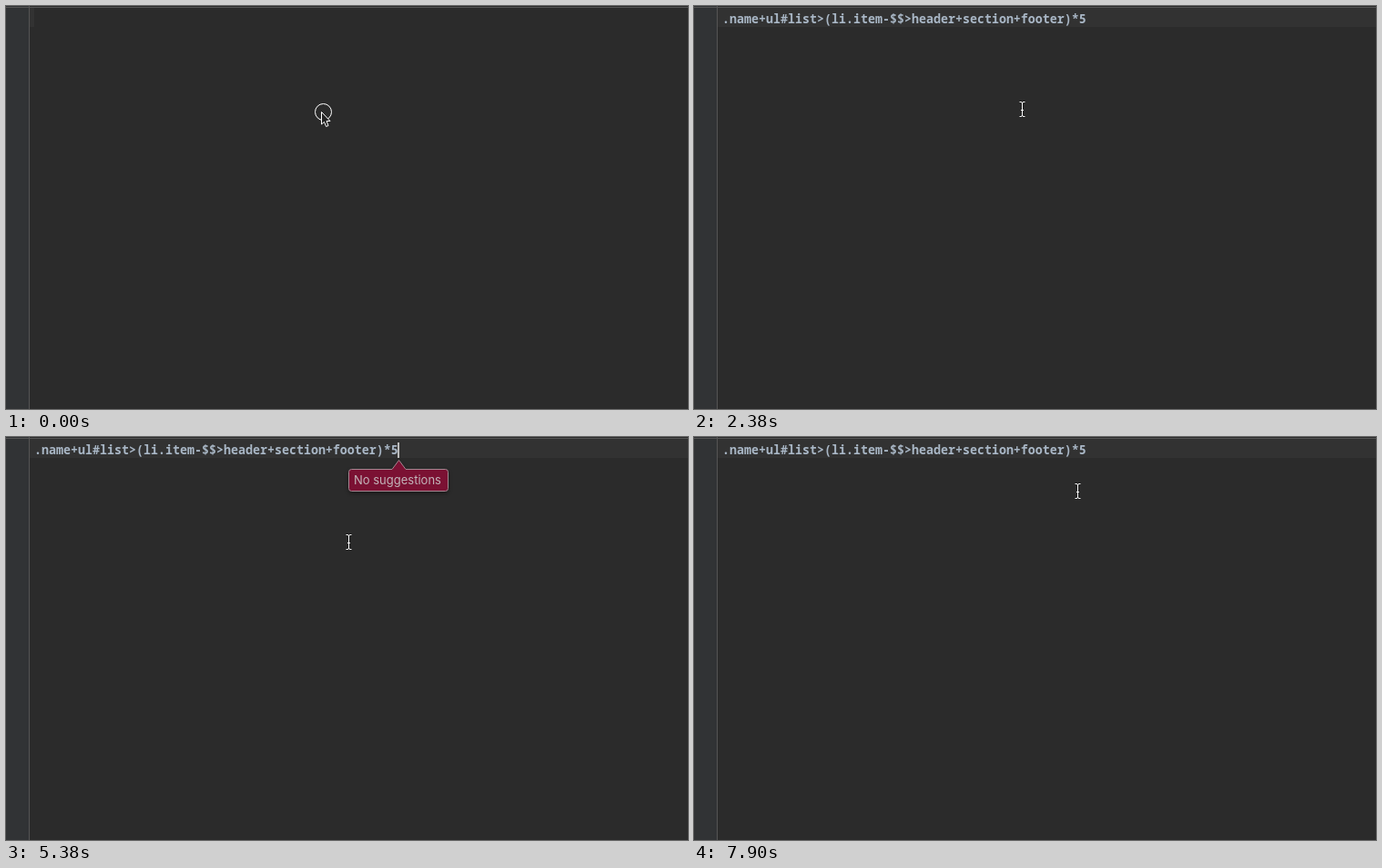
Write an HTML page that moves like this. It is 749x443 px and loops after 8000 ms.

```html
<!DOCTYPE html>
<html lang="en">
<head>
<meta charset="utf-8">
<title>Abbreviation editor</title>
<style>
  html, body { margin: 0; width: 100%; height: 100%; overflow: hidden; background: #2b2b2b; }
  svg { display: block; width: 749px; height: 443px; }
  .code { font: 600 13.3333px "Noto Sans Mono", monospace; fill: #a9b7c6; white-space: pre; }
  .hint { font: 400 13px Inter, sans-serif; fill: #c3b5ba; }
  .balloon { fill: #7b1133; stroke: #a58791; filter: drop-shadow(0 2px 2px rgba(0, 0, 0, .4)); }
</style>
</head>
<body>
<svg viewBox="0 0 749 443">
  <rect width="749" height="443" fill="#2b2b2b"/>
  <rect width="25" height="443" fill="#313335"/>
  <rect id="row" x="26" y="2" height="21" fill="#323232"/>
  <rect x="25" width="1" height="443" fill="#555"/>
  <rect y="1" width="749" height="1" fill="#555"/>

  <text id="code" class="code" x="31" y="19">.name+ul#list&gt;(li.item-$$&gt;header+section+footer)*5</text>
  <rect id="caret" y="6" width="2" height="17" fill="#bbb"/>

  <g id="popup">
    <path class="balloon" d="M379.5 35.5H424L431.5 25.5L439 35.5H482.5a3 3 0 0 1 3 3V56.5a3 3 0 0 1-3 3H379.5a3 3 0 0 1-3-3V38.5a3 3 0 0 1 3-3z"/>
    <text class="hint" x="382" y="52">No suggestions</text>
  </g>

  <g id="arrow" stroke="#fff">
    <circle cx="348.5" cy="116.5" r="9" fill="none"/>
    <path fill="#222" d="M346.5 116.5V130L349.5 127.4L351.6 132.5L354 131.5L352 126.5H356z"/>
  </g>
  <g id="beam" fill="none">
    <path id="beamShape" stroke="#1c1c1c" stroke-width="2.4" d="M1.5 1.5H3Q4.5 1.5 4.5 3V16Q4.5 17.5 3 17.5H1.5M7.5 1.5H6Q4.5 1.5 4.5 3M4.5 16Q4.5 17.5 6 17.5H7.5M3 10.5H6"/>
    <use href="#beamShape" id="beamLight"/>
    <path stroke="#fff" d="M1.5 1.5H3Q4.5 1.5 4.5 3V16Q4.5 17.5 3 17.5H1.5M7.5 1.5H6Q4.5 1.5 4.5 3M4.5 16Q4.5 17.5 6 17.5H7.5M3 10.5H6"/>
  </g>
</svg>
<script>
const LOOP = 8000;
const START = 31, BEFORE_LAST = 422, END = 430;

// Each track is a list of [time in ms, value]; values hold until the next step.
const tracks = {
  row: [[0, 5], [440, 0], [1630, 723]],
  code: [[0, false], [1630, true]],
  popup: [[0, false], [5380, true], [7160, false]],
  arrow: [[0, true], [150, false]],
  beam: [[0, null], [150, [348, 106]], [310, [341, 101]], [730, [341, 102]],
         [2380, [356, 104]], [2530, [372, 106]], [7600, [380, 92]], [7750, [417, 50]]],
  caret: [[0, null], [440, START], [880, null], [1330, START], [1630, END], [2380, null],
          [2830, END], [3730, BEFORE_LAST], [4180, END], [4930, null], [5380, END],
          [5970, null], [6420, END], [6860, null], [7460, END], [7900, null]]
};

const el = id => document.getElementById(id);
const valueAt = (name, t) => tracks[name].findLast(([from]) => from <= t)[1];
const show = (id, on) => el(id).setAttribute("visibility", on ? "visible" : "hidden");

el("beamLight").remove();

function draw(t) {
  el("row").setAttribute("width", valueAt("row", t));
  for (const id of ["code", "popup", "arrow"]) show(id, valueAt(id, t));

  const caret = valueAt("caret", t);
  show("caret", caret !== null);
  if (caret !== null) el("caret").setAttribute("x", caret);

  const beam = valueAt("beam", t);
  show("beam", beam);
  if (beam) el("beam").setAttribute("transform", `translate(${beam})`);
}

const begin = performance.now();
function tick() {
  draw((performance.now() - begin) % LOOP);
  requestAnimationFrame(tick);
}
draw(0);
requestAnimationFrame(tick);
</script>
</body>
</html>
```
